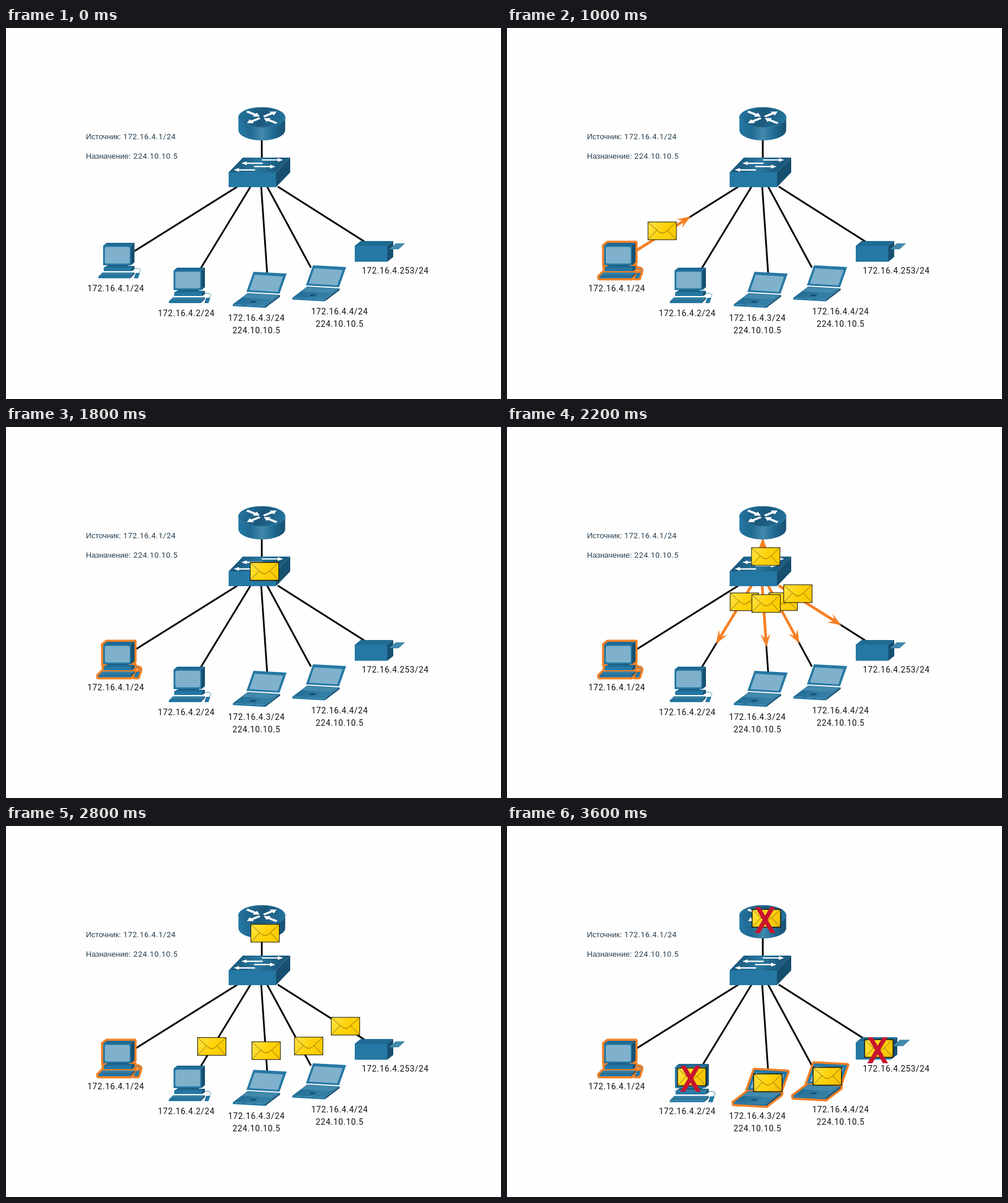
An HTML page with a canvas that plays this animation: 836 px wide and 627 px high, repeating every 4 s.

```html
<!DOCTYPE html>
<html lang="ru">
<head>
<meta charset="utf-8">
<style>
  html, body { margin: 0; width: 100%; height: 100%; overflow: hidden; background: #fefefe; }
  canvas { display: block; }
</style>
</head>
<body>
<canvas id="stage" width="836" height="627"></canvas>
<script>
const ctx = document.getElementById('stage').getContext('2d');
const LOOP = 4000, STEP = 200, SPREAD = 1800, ARRIVAL = 3200;
const DARK = '#174f70', MID = '#1f6a93', FACE = '#2578a4', LIGHT = '#4289ac', PALE = '#7fb1cc';
let halo = null; // while set, devices are stroked in this colour instead of filled

const clamp = v => Math.max(0, Math.min(1, v));
const ramp = (t, from, to) => clamp((t - from) / (to - from));
const mix = (a, b, p) => a + (b - a) * p;
const between = (a, b, p) => [mix(a[0], b[0], p), mix(a[1], b[1], p)];
const orange = p => `rgb(${[245, 128, 37].map(c => Math.round(mix(254, c, p)))})`;

function shade(x1, y1, x2, y2, ...colors) {
  const g = ctx.createLinearGradient(x1, y1, x2, y2);
  colors.forEach((c, i) => g.addColorStop(i / (colors.length - 1), c));
  return g;
}

function at(x, y, draw, scale = 1) {
  ctx.save();
  ctx.translate(x, y);
  ctx.scale(scale, scale);
  draw();
  ctx.restore();
}

function faded(alpha, draw) {
  ctx.save();
  ctx.globalAlpha = alpha;
  draw();
  ctx.restore();
}

function line(from, to, color, width) {
  ctx.beginPath();
  ctx.moveTo(...from);
  ctx.lineTo(...to);
  ctx.strokeStyle = color;
  ctx.lineWidth = width;
  ctx.stroke();
}

// Parallelogram spanned from (x, y) by the vectors a and b
function slab(fill, x, y, ax, ay, bx, by) {
  ctx.beginPath();
  ctx.moveTo(x, y);
  ctx.lineTo(x + ax, y + ay);
  ctx.lineTo(x + ax + bx, y + ay + by);
  ctx.lineTo(x + bx, y + by);
  ctx.closePath();
  if (halo) {
    ctx.strokeStyle = halo;
    ctx.lineWidth = 7;
    ctx.lineJoin = 'round';
    ctx.stroke();
  } else {
    ctx.fillStyle = fill;
    ctx.fill();
  }
}

// Box seen from above: front face w by h, receding along (dx, -dy)
function box(x, y, w, h, dx, dy, tilt = 0, top = MID) {
  slab(top, x, y, w, tilt, dx, -dy);
  slab(DARK, x + w, y + tilt, 0, h, dx, -dy);
  slab(FACE, x, y, w, tilt, 0, h);
}

// Arrow along the x axis, with barbs swept back
function arrow(color, length, half, head, shaft, sweep = 0) {
  const neck = length - head + sweep;
  ctx.beginPath();
  ctx.moveTo(0, -shaft);
  ctx.lineTo(neck, -shaft);
  ctx.lineTo(length - head, -half);
  ctx.lineTo(length, 0);
  ctx.lineTo(length - head, half);
  ctx.lineTo(neck, shaft);
  ctx.lineTo(0, shaft);
  ctx.fillStyle = color;
  ctx.fill();
}

function router() {
  const rx = 39.5, ry = 17;
  ctx.beginPath();
  ctx.ellipse(0, 0, rx, ry, 0, Math.PI, 0);
  ctx.ellipse(0, 22, rx, ry, 0, 0, Math.PI);
  ctx.closePath();
  ctx.fillStyle = shade(-rx, 0, rx, 0, FACE, MID, LIGHT, MID, DARK);
  ctx.fill();
  ctx.beginPath();
  ctx.ellipse(0, 0, rx, ry, 0, 0, Math.PI * 2);
  ctx.fillStyle = shade(-rx, -ry, rx, ry, FACE, '#1b587b', FACE);
  ctx.fill();
  ctx.strokeStyle = LIGHT;
  ctx.lineWidth = 0.6;
  ctx.stroke();
  for (const sx of [-1, 1]) for (const sy of [-1, 1]) {
    const inward = sx === sy;
    ctx.save();
    ctx.scale(sx, sy * 0.6);
    ctx.rotate(0.58);
    ctx.translate(inward ? 30 : 4, 0);
    ctx.scale(inward ? -1 : 1, 1);
    arrow('#fff', 26, 6.5, 10, 2.6);
    ctx.restore();
  }
}

function networkSwitch() {
  box(0, 25, 80, 25, 24, 25, 0, shade(20, 0, 80, 25, '#1b5b80', '#2b789f', '#1b5b80'));
  for (let row = 0; row < 4; row++) {
    const toRight = row % 2 === 0;
    at((toRight ? 56 : 64) - 6.5 * row, 4 + 5.6 * row, () => {
      ctx.scale(toRight ? 1 : -1, 1);
      arrow('#fff', 36, 3.2, 9, 1.1);
    });
  }
}

function desktop() {
  box(8, 5, 47, 33, 6, 5);
  if (!halo) {
    ctx.beginPath();
    ctx.roundRect(11, 7, 42, 28, 3);
    ctx.fillStyle = PALE;
    ctx.fill();
  }
  slab(DARK, 15, 38, 36, 0, 0, 3);
  box(9, 42, 47, 6, 5, 3);
  box(0, 57, 54, 3, 7, 7, 0, shade(0, 50, 0, 57, LIGHT, MID));
  ctx.beginPath();
  ctx.moveTo(59, 44);
  ctx.bezierCurveTo(70, 41, 75, 46, 67, 52);
  ctx.strokeStyle = halo || LIGHT;
  ctx.lineWidth = halo ? 7 : 1;
  ctx.stroke();
  slab(FACE, 60, 60, 7, 0, 3, -9);
}

function laptop() {
  slab(FACE, 23, 33, 56, 3, 12, -34);
  slab(PALE, 28, 30, 48, 3, 9, -26);
  box(0, 54, 55, 3, 25, 19, 3, shade(20, 34, 36, 58, MID, '#327ea5'));
  slab(LIGHT, 15, 43, 50, 3, 10, -7);
  slab(DARK, 28, 51, 9, 0.5, 4, -3);
}

function printer() {
  box(0, 8, 55, 27, 10, 8);
  slab(LIGHT, 58, 14, 16, 0, 11, -10);
}

function envelope([x, y], resting) {
  at(x, y, () => {
    ctx.fillStyle = shade(-24, -15, 24, 15, '#ffe348', '#ffd20a', resting ? '#f2bd0a' : '#fbca00');
    ctx.fillRect(-24, -15, 48, 30);
    ctx.beginPath();
    for (const side of [-1, 1]) {
      ctx.moveTo(24 * side, -15);
      ctx.lineTo(9 * side, -1);
      ctx.quadraticCurveTo(4 * side, 4, 0, 4);
      ctx.moveTo(24 * side, 15);
      ctx.lineTo(9 * side, -1);
    }
    ctx.strokeStyle = '#6b560c';
    ctx.lineWidth = 0.8;
    ctx.stroke();
    ctx.strokeStyle = '#151300';
    ctx.lineWidth = resting ? 1.4 : 1;
    ctx.strokeRect(-24, -15, 48, 30);
  });
}

function cross([x, y]) {
  for (const side of [-1, 1]) slab('#c8142f', x - 17 * side, y - 22, 8.5 * side, 0, 26 * side, 44);
}

const kinds = {
  desktop: { draw: desktop, rest: [37, 19], labelDrop: 82 },
  laptop: { draw: laptop, rest: [57.5, 21], labelDrop: 82 },
  printer: { draw: printer, rest: [39, 16], labelDrop: 55 }
};

// plug: cable end at the switch; port: cable end at the device
function host(kind, x, y, plug, port, labelX, number, member = false) {
  const { draw, rest, labelDrop } = kinds[kind];
  return {
    draw, x, y, member, plug: [plug, 268], port,
    rest: [x + rest[0], y + rest[1]],
    label: [labelX, y + labelDrop],
    lines: [`172.16.4.${number}/24`, member ? GROUP : '']
  };
}

const GROUP = '224.10.10.5';
const hub = [436.5, 244];
const sender = host('desktop', 156, 363, 391, [217, 377], 185.5, 1);
const hosts = [
  sender,
  host('desktop', 275, 405, 413, [329, 406], 304.5, 2),
  host('laptop', 483.5, 402, 441, [515, 405], 563.5, 4, true),
  host('laptop', 383, 413, 431, [441, 414], 423, 3, true),
  host('printer', 589, 360, 459, [607, 362], 657.5, 253)
];
const gateway = { plug: [432, 232], port: [432, 169], rest: [438, 156] };
const receivers = [...hosts.slice(1), gateway];

function write(text, x, y, size, color, align) {
  const numeric = /^\d/.test(text);
  ctx.font = `${size}px ${numeric ? 'Roboto' : '"Liberation Sans"'}, sans-serif`;
  ctx.letterSpacing = numeric ? '0.045em' : '0px';
  ctx.textAlign = align;
  ctx.fillStyle = color;
  ctx.fillText(text, x, y);
}

function texts() {
  const ink = '#263e50';
  write('Источник:', 135, 188, 13, ink, 'left');
  write('172.16.4.1/24', 198, 188, 13, ink, 'left');
  write('Назначение:', 135, 221, 13, ink, 'left');
  write(GROUP, 215, 221, 13, ink, 'left');
  for (const { label: [x, y], lines } of hosts)
    lines.forEach((text, i) => write(text, x, y + 21 * i, 14, '#111', 'center'));
}

// Arrow that grows along a cable, then pales away
function trail(from, to, grow, strength) {
  if (grow <= 0 || strength <= 0) return;
  const dx = to[0] - from[0], dy = to[1] - from[1];
  at(...from, () => {
    ctx.rotate(Math.atan2(dy, dx));
    arrow(orange(strength), Math.hypot(dx, dy) * grow, 8.5, 23, 2.3, 7);
  });
}

function cables(t) {
  for (const { plug, port } of [...hosts, gateway]) line(plug, port, '#000', 2.9);
  trail(sender.port, sender.plug, ramp(t, 700, 1260), ramp(t, SPREAD, 1240));
  for (const { plug, port } of receivers)
    trail(plug, port, ramp(t, SPREAD, 2360), ramp(t, 2800, 2360));
}

function devices(t) {
  for (const h of hosts) {
    const glow = h === sender ? ramp(t, 0, 600) : h.member ? ramp(t, ARRIVAL, 3600) : 0;
    const swollen = t >= ARRIVAL && h !== sender && !h.member;
    at(h.x, h.y - (swollen ? 3 : 0), () => {
      if (glow > 0) {
        halo = orange(glow);
        h.draw();
        halo = null;
      }
      h.draw();
    }, swollen ? 1.08 : 1);
  }
  at(432, 151, router);
  at(376, 219, networkSwitch);
}

function messages(t) {
  if (t < SPREAD) {
    const p = ramp(t, 683, SPREAD);
    faded(ramp(t, 100, 680), () => envelope(between(sender.rest, hub, p), p === 0));
    return;
  }
  // The flight pauses briefly before delivery
  const p = ramp(t < ARRIVAL ? Math.min(t, 2800) : t, SPREAD, ARRIVAL);
  for (const { rest } of receivers) envelope(between(hub, rest, p), p === 1);
  faded(ramp(t, 3120, 3560), () => {
    for (const { rest: [x, y], member } of receivers) if (!member) cross([x - 2, y + 3]);
  });
}

function frame() {
  const t = Math.floor((performance.now() % LOOP) / STEP) * STEP;
  ctx.fillStyle = '#fefefe';
  ctx.fillRect(0, 0, 836, 627);
  cables(t);
  devices(t);
  texts();
  messages(t);
  requestAnimationFrame(frame);
}
frame();
</script>
</body>
</html>
```
